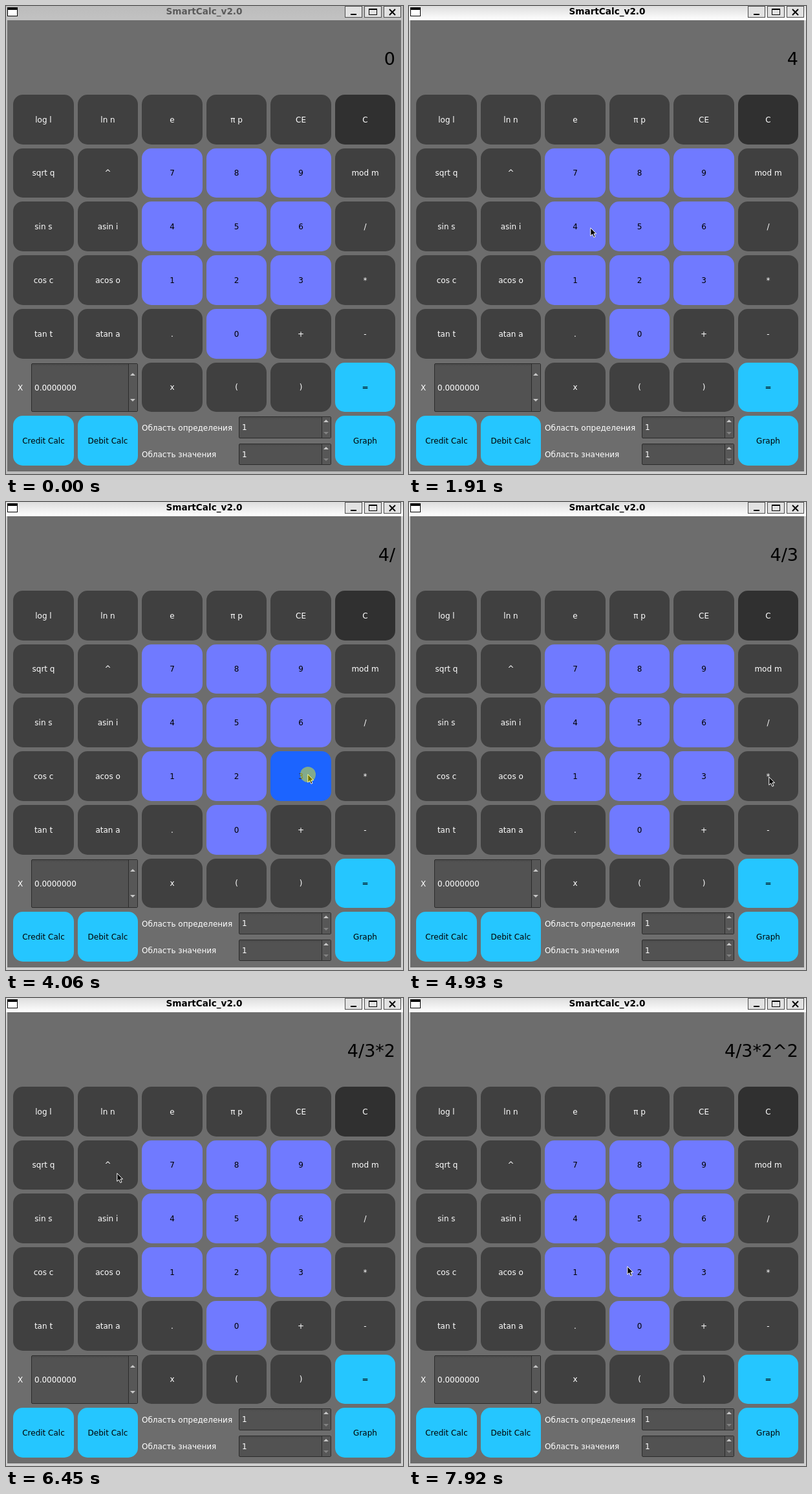
An HTML page for the animation above (8 s loop, 614 px wide and 723 px high).

```html
<!DOCTYPE html>
<html lang="ru">
<head>
<meta charset="utf-8">
<title>SmartCalc_v2.0</title>
<style>
  html, body { margin: 0; width: 100%; height: 100%; overflow: hidden; }
  body { background: #bebebe; font: 12px "DejaVu Sans", sans-serif; color: #fff; }
  #stage { position: relative; width: 614px; height: 723px; overflow: hidden; background: #bebebe; }
  #stage.active { background: #d0d0d0; }
  #stage div, #stage svg { position: absolute; }
  #title {
    left: 0; top: 0; width: 614px; height: 22px;
    background: linear-gradient(#bcbcbc, #c2c2c2);
    font-weight: bold; font-size: 13.6px; line-height: 17px; color: #5a5a5a;
  }
  #title span { position: absolute; left: 0; width: 613px; text-align: center; }
  .active #title { background: linear-gradient(#dedede, #fff); color: #000; }
  #body { left: 2px; top: 22px; width: 609px; height: 697px; background: #6d6d6d; }
  #display { right: 12px; top: 66px; font-size: 27px; line-height: 31px; color: #000; white-space: pre; }
  .key {
    display: flex; align-items: center; justify-content: center;
    border-radius: 15px; background: #404040; white-space: pre;
  }
  .num { background: #707aff; color: #000; }
  .cyan { background: #25c6ff; color: #000; }
  .clear { background: #303030; }
  .key.pressed { background: #545454; }
  .num.pressed { background: #1c64ff; color: #333; }
  .label { line-height: 16px; white-space: pre; }
  .spin {
    box-sizing: border-box; display: flex; align-items: center; padding-left: 4px;
    border: 1px solid #2c2c2c; border-radius: 2px;
    background: linear-gradient(#4b4b4b, #525252 4px);
  }
  .steps { right: 0; top: 0; bottom: 0; width: 13px; border-left: 1px solid #2c2c2c; background: #575757; }
  .steps::before, .steps::after {
    content: ""; position: absolute; left: 2px; border: 4px solid transparent;
  }
  .steps::before { top: calc(25% - 4px); border-top: 0; border-bottom-color: #c8c8c8; }
  .steps::after { bottom: calc(25% - 3px); border-bottom: 0; border-top-color: #c8c8c8; }
  .floor .steps::after { border-top-color: #828282; }
  #ring { width: 24px; height: 24px; margin: -11px; border-radius: 50%; background: rgba(255, 255, 0, .45); }
  #cursor, #ring { left: 0; top: 0; }
</style>
</head>
<body>
<div id="stage">
  <div id="title"><span>SmartCalc_v2.0</span>
    <svg width="614" height="22" fill="none" shape-rendering="crispEdges">
      <path fill="#000" d="M2 2h16v14H2z"/><path fill="#fff" d="M3 6h14v9H3z"/>
      <g fill="#e2e2e2" stroke="#4c4c4c">
        <path d="M524.5 .5h26v17h-26zM554.5 .5h26v17h-26zM584.5 .5h26v17h-26z"/>
      </g>
      <path fill="#000" d="M533 12h9v2h-9zM561 4h13v2h-13z"/>
      <path stroke="#000" d="M561.5 4.5h12v9h-12z"/>
      <path stroke="#000" stroke-width="2" shape-rendering="auto" d="M593 5l9 9M602 5l-9 9"/>
    </svg>
  </div>
  <div id="body"></div>
  <div id="display">0</div>
  <div class="label" style="left:18px;top:582px">X</div>
  <div class="spin" style="left:39px;top:552px;width:165px;height:75px">0.0000000<div class="steps"></div></div>
  <div class="label" style="left:210px;top:644px">Область определения</div>
  <div class="spin floor" style="left:360px;top:634px;width:143px;height:34px">1<div class="steps"></div></div>
  <div class="label" style="left:210px;top:685px">Область значения</div>
  <div class="spin floor" style="left:360px;top:676px;width:143px;height:33px">1<div class="steps"></div></div>
  <svg id="cursor" width="12" height="18">
    <path d="M.8 .8V13.2L3.7 10.6L5.9 15.4L8 14.4L5.9 9.8H9.6Z" fill="#000" stroke="#fff"/>
  </svg>
  <div id="ring"></div>
</div>
<script>
  const LOOP = 8000;
  const $ = id => document.getElementById(id);
  const stage = $('stage'), display = $('display'), cursor = $('cursor'), ring = $('ring');

  const rows = [
    'log l|ln n|e|π p|CE|C',
    'sqrt q|^|7|8|9|mod m',
    'sin s|asin i|4|5|6|/',
    'cos c|acos o|1|2|3|*',
    'tan t|atan a|.|0|+|-',
    '||x|(|)|=',
    'Credit Calc|Debit Calc||||Graph'
  ];
  const keys = {};

  function keyClass(text) {
    if (/^\d$/.test(text)) return 'key num';
    if (/^(=|Graph|.* Calc)$/.test(text)) return 'key cyan';
    return text === 'C' ? 'key clear' : 'key';
  }

  rows.forEach((row, r) => row.split('|').forEach((text, c) => {
    if (!text) return;
    const x = 11 + 99.5 * c, y = 137 + 82.7 * r;
    const left = Math.round(x), top = Math.round(y);
    const key = keys[text] = document.createElement('div');
    key.className = keyClass(text);
    key.textContent = text;
    key.style.cssText = `left:${left}px;top:${top}px;` +
      `width:${Math.round(x + 93.5) - left}px;height:${Math.round(y + 76.7) - top}px`;
    stage.insertBefore(key, cursor);
  }));

  // Pointer waypoints: time, x, y
  const path = [
    [210, 566, 675], [940, 310, 373], [1040, 310, 373], [1220, 273, 352], [1330, 258, 337],
    [1790, 258, 337], [2050, 330, 348], [2590, 573, 340], [2690, 574, 340],
    [3160, 574, 340], [3830, 466, 420], [4350, 466, 420], [4880, 556, 424],
    [5200, 556, 424], [5650, 364, 432], [5820, 333, 415],
    [6010, 333, 415], [6450, 171, 270], [6550, 171, 270], [6690, 165, 262],
    [6850, 165, 262], [7620, 340, 421], [7700, 340, 421], [7790, 337, 414], [LOOP, 337, 414]
  ];
  const clicks = [
    [1530, '4'], [2900, '/'], [4040, '3'], [4980, '*'], [5870, '2'], [6725, '^'], [7800, '2']
  ];
  const PRESS = 20, RELEASE = 100, FADE = 120;

  const slope = (i, axis) => path[i + 1]
    ? (path[i + 1][axis] - path[i][axis]) / (path[i + 1][0] - path[i][0]) : 0;

  // Zero at turning points and stops, so the curve never overshoots
  function tangent(i, axis) {
    if (i === 0) return 0;
    const a = slope(i - 1, axis), b = slope(i, axis);
    return a * b > 0 ? 2 * a * b / (a + b) : 0;
  }

  function position(t, axis) {
    let i = 0;
    while (i < path.length - 2 && t >= path[i + 1][0]) i++;
    const span = path[i + 1][0] - path[i][0];
    const u = Math.max(0, (t - path[i][0]) / span), v = 1 - u;
    return Math.round(
      path[i][axis] * v * v * (1 + 2 * u) + path[i + 1][axis] * u * u * (3 - 2 * u) +
      span * u * v * (v * tangent(i, axis) - u * tangent(i + 1, axis)));
  }

  function draw(t) {
    const move = `translate(${position(t, 1)}px, ${position(t, 2)}px)`;
    cursor.style.transform = ring.style.transform = move;
    cursor.style.visibility = t < path[0][0] ? 'hidden' : 'visible';

    let typed = '', held = null, ringOn = false;
    for (const [start, text] of clicks) {
      const age = t - start;
      if (age >= RELEASE) typed += text;
      else if (age >= PRESS) held = text;
      if (age >= 0 && age < FADE) ringOn = true;
    }
    display.textContent = typed || '0';
    ring.style.visibility = ringOn ? 'visible' : 'hidden';
    stage.classList.toggle('active', t >= clicks[0][0] + PRESS);
    for (const text in keys) keys[text].classList.toggle('pressed', text === held);
  }

  const begin = performance.now();
  function tick() {
    draw((performance.now() - begin) % LOOP);
    requestAnimationFrame(tick);
  }
  tick();
</script>
</body>
</html>
```
